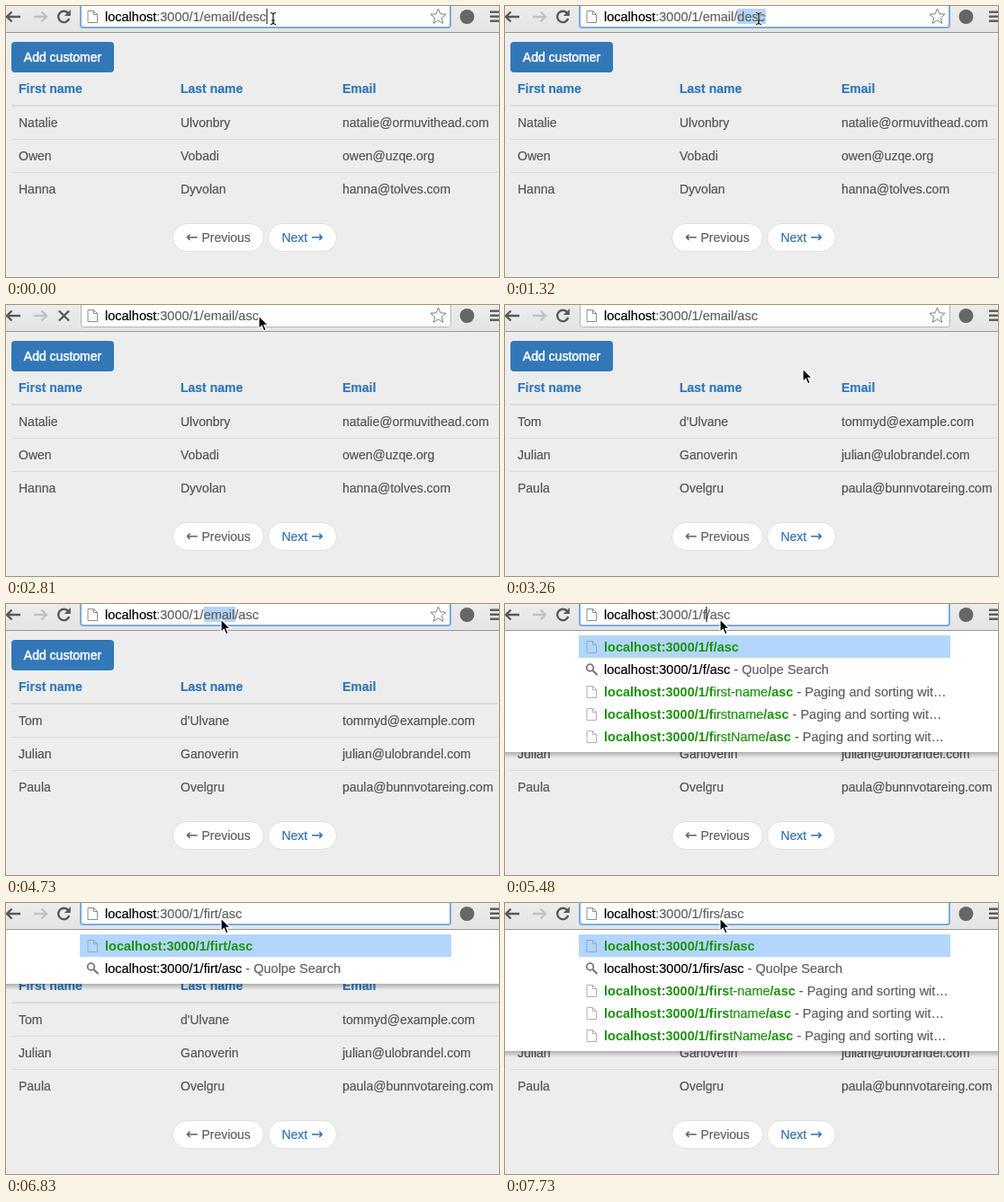
Animation of 548 by 302 pixels, one loop 8 s. Source, as an HTML page:

```html
<!DOCTYPE html>
<html lang="en">
<head>
<meta charset="utf-8">
<title>Sorting by address</title>
<style>
html, body { margin: 0; width: 100%; height: 100%; overflow: hidden; background: #ededed; }
svg { display: block; width: 548px; height: 302px; }
text { font: 14px "Liberation Sans", Arial, sans-serif; white-space: pre; color: #555; }
text, tspan { fill: currentColor; stroke: currentColor; stroke-width: .2px; }
.bar { font-size: 14.5px; }
.b { font-weight: bold; stroke-width: 0; }
.head { font-weight: bold; color: #3277b8; }
.button { color: #fff; stroke-width: .5px; }
.arrow { font: 16px "DejaVu Sans", sans-serif; }
.hit { color: #1c930c; }
.dim { color: #606060; }
.link { color: #2f70b3; }
.black { color: #000; }
</style>
</head>
<body>
<svg id="stage" viewBox="0 0 548 302"></svg>
<script>
const LOOP = 8000;
const stage = document.getElementById('stage');
const HOST = 'localhost', BASE = 'localhost:3000/1/';
const COLS = [14, 194, 374];

const byDesc = [
  ['Natalie', 'Ulvonbry', 'natalie@ormuvithead.com'],
  ['Owen', 'Vobadi', 'owen@uzqe.org'],
  ['Hanna', 'Dyvolan', 'hanna@tolves.com']
];
const byAsc = [
  ['Tom', "d'Ulvane", 'tommyd@example.com'],
  ['Julian', 'Ganoverin', 'julian@ulobrandel.com'],
  ['Paula', 'Ovelgru', 'paula@bunnvotareing.com']
];

// What the browser shows from each time on; caret and sel are x positions.
const scenes = [
  { at: 0, path: 'email/desc', focus: 1, caret: 290 },
  { at: 590, path: 'email/desc', focus: 1 },
  { at: 1170, path: 'email/desc', focus: 1, caret: 290 },
  { at: 1320, path: 'email/desc', focus: 1, sel: [258, 290] },
  { at: 1770, path: 'email/a', focus: 1, caret: 266, title: 'with Mith…' },
  { at: 2060, path: 'email/as', focus: 1, caret: 273, title: 'with Mit…' },
  { at: 2360, path: 'email/asc', focus: 1, caret: 281.5, title: 'with M…' },
  { at: 2810, path: 'email/asc', loading: 1 },
  { at: 3110, path: 'email/asc', loading: 1, blank: 1 },
  { at: 3260, path: 'email/asc' },
  { at: 4580, path: 'email/asc', focus: 1, sel: [110, 281] },
  { at: 4730, path: 'email/asc', focus: 1, sel: [220, 255] },
  { at: 5480, path: 'f/asc', focus: 1, caret: 224, typed: 'f' },
  { at: 5630, path: 'fi/asc', focus: 1, caret: 228, typed: 'fi' },
  { at: 5780, path: 'fir/asc', focus: 1, caret: 232.5, typed: 'fir' },
  { at: 6230, path: 'firt/asc', focus: 1, caret: 237.5, typed: 'firt' },
  { at: 6830, path: 'firt/asc', focus: 1, typed: 'firt' },
  { at: 7130, path: 'firs/asc', focus: 1, caret: 239.5, typed: 'firs' },
  { at: 7730, path: 'firs/asc', focus: 1, typed: 'firs' }
];

// Pointer: [time, x, y], held until the next entry.
const moves = [
  [0, 297, 14], [140, 295, 14], [290, 291, 14], [440, 286, 13], [590, 281, 13],
  [730, 278, 13], [880, 277, 14], [1030, 279, 14], [1170, 282, 14],
  [1770, 281, 12], [3110, 306, 42], [3260, 331, 71], [3400, 337, 90],
  [4000, 332, 84], [4150, 297, 56], [4290, 256, 28], [4440, 239, 17]
];

const last = (list, test) => list.filter(test).pop();
const span = (cls, s) => `<tspan class="${cls}">${s}</tspan>`;
const text = (x, y, s, cls = '', more = '') => `<text x="${x}" y="${y}" class="${cls}" ${more}>${s}</text>`;
const rect = (x, y, w, h, fill, more = '') =>
  `<rect x="${x}" y="${y}" width="${w}" height="${h}" fill="${fill}" ${more}/>`;
const line = (d, color, w) => `<path d="${d}" fill="none" stroke="${color}" stroke-width="${w}"/>`;

const pageIcon = (y, color) => line(`M91 ${y + .5}h6.5l4 4v9h-10.5zM97.5 ${y + .5}v4h4`, color, 1);

function star(cx, cy) {
  const pts = Array.from({ length: 10 }, (_, i) => {
    const a = i * Math.PI / 5 - Math.PI / 2, r = i % 2 ? 4 : 9;
    return (cx + r * Math.cos(a)).toFixed(1) + ',' + (cy + r * Math.sin(a)).toFixed(1);
  });
  return `<polygon points="${pts.join(' ')}" fill="#fff" stroke="#808080" stroke-linejoin="round"/>`;
}

const pill = (x, w, s, cls) => rect(x, 242.5, w, 31, '#fff', 'rx="15.5" stroke="#e0e0e0"') +
  text(x + w / 2, 263, s, cls, 'text-anchor="middle"');

function page(rows) {
  let out = rect(6, 40, 114, 34, '#3277b7', 'rx="4"') +
    text(63, 62, 'Add customer', 'button', 'text-anchor="middle"');
  ['First name', 'Last name', 'Email'].forEach((s, i) => out += text(COLS[i], 97, s, 'head'));
  out += rect(6, 110, 541, 2, '#dadada');
  rows.forEach((row, r) => {
    if (r) out += rect(6, 111 + r * 37, 541, 1, '#dadada');
    row.forEach((s, i) => out += text(COLS[i], 135 + r * 37, s));
  });
  return out + pill(185.5, 101, span('arrow', '←') + ' Previous', 'dim') +
    pill(291.5, 76, 'Next ' + span('arrow', '→'), 'link');
}

function toolbar(s, open) {
  const ink = '#5a5a5a';
  let out = rect(0, 0, 548, 29, 'url(#chrome)') + rect(0, 29, 548, 1, '#999') +
    line('M16 12H1M6.5 6.5L1 12L6.5 17.5', ink, 2.4) +
    line('M31 12H45M39.5 6.5L45 12L39.5 17.5', '#c2c2c2', 2.4);
  out += s.loading
    ? line('M59 6.5l11 11M70 6.5l-11 11', ink, 2.4)
    : line('M69.3 8.2A6.2 6.2 0 1 0 70.2 14', ink, 2.4) + `<path d="M71.8 4v7h-7z" fill="${ink}"/>`;
  out += s.focus
    ? rect(83, -8, 411, 32, '#fff', 'rx="3" stroke="#78abe3" stroke-width="2"')
    : rect(83.5, -8, 411, 32.5, '#fff', 'rx="3" stroke="#b4b4b4"');
  if (s.sel) out += rect(s.sel[0], 3, s.sel[1] - s.sel[0], 17, '#b3d4fd');
  out += pageIcon(5, '#8c8c8c') +
    text(110, 17, span('black', HOST) + span('dim', BASE.slice(HOST.length) + s.path), 'bar');
  if (s.caret) out += rect(s.caret - .5, 3, 1, 17, '#000');
  if (!open) out += star(480.5, 12);
  out += '<circle cx="512.5" cy="12" r="8" fill="#666"/>';
  [6, 11, 16].forEach(y => out += rect(538, y - .5, 10, 2.4, ink));
  return out;
}

function dropdown(s) {
  const url = BASE + s.path, tail = t => span('dim', ' - ' + t);
  const items = [
    span('b hit', url) + (s.title ? tail('Paging and sorting ' + s.title) : ''),
    span('black', url) + tail('Quolpe Search')
  ];
  for (const word of ['first-name', 'firstname', 'firstName']) {
    if (s.typed && word.startsWith(s.typed)) {
      items.push(span('b hit', BASE + s.typed) + span('hit', word.slice(s.typed.length)) +
        span('b hit', '/asc') + tail('Paging and sorting wit…'));
    }
  }
  const end = 40 + items.length * 25;
  let out = rect(0, end, 548, 7, 'url(#shade)') + rect(0, 30, 548, end - 30, '#fff') +
    rect(82, 35, 413, 25, '#b2d6fd');
  items.forEach((item, i) => {
    out += i === 1
      ? '<circle cx="94.5" cy="71" r="3.8" fill="none" stroke="#777" stroke-width="1.8"/>' +
        line('M97.5 74l5 5', '#777', 2.2)
      : pageIcon(41 + i * 25, i ? '#b0b0b0' : '#93a9c0');
    out += text(110, 53 + i * 25, item, 'bar');
  });
  return out;
}

function pointer(t) {
  const [, x, y] = last(moves, m => m[0] <= t);
  const beam = 'M-3 -6.5q3 0 3 2.5v8q0 2.5 -3 2.5M3 -6.5q-3 0 -3 2.5v8q0 2.5 3 2.5M-2 2h4';
  const shape = t < 1770
    ? line(beam, '#fff', 2.6) + line(beam, '#111', 1.2)
    : '<path d="M0 0V14.5L3.3 11.4L5.6 16.8L8.2 15.7L5.9 10.4H10.4Z" stroke="#fff" stroke-width="1.2"/>';
  return `<g transform="translate(${x} ${y})">${shape}</g>`;
}

const gradient = (id, stops) => `<linearGradient id="${id}" x2="0" y2="1">` +
  stops.map(([c, o], i) => `<stop offset="${i}" stop-color="${c}" stop-opacity="${o}"/>`).join('') +
  '</linearGradient>';
const defs = '<defs>' + gradient('chrome', [['#ececec', 1], ['#e4e4e4', 1]]) +
  gradient('shade', [['#000', .26], ['#000', 0]]) + '</defs>';

let shown = '';
function draw(t) {
  const s = last(scenes, e => e.at <= t);
  const open = s.title || s.typed;
  const view = defs + rect(0, 0, 548, 302, '#ededed') +
    (s.blank ? '' : page(t < 3110 ? byDesc : byAsc)) +
    toolbar(s, open) + (open ? dropdown(s) : '') + pointer(t);
  if (view !== shown) stage.innerHTML = shown = view;
}

const start = performance.now();
function tick() {
  draw((performance.now() - start) % LOOP);
  requestAnimationFrame(tick);
}
tick();
</script>
</body>
</html>
```
